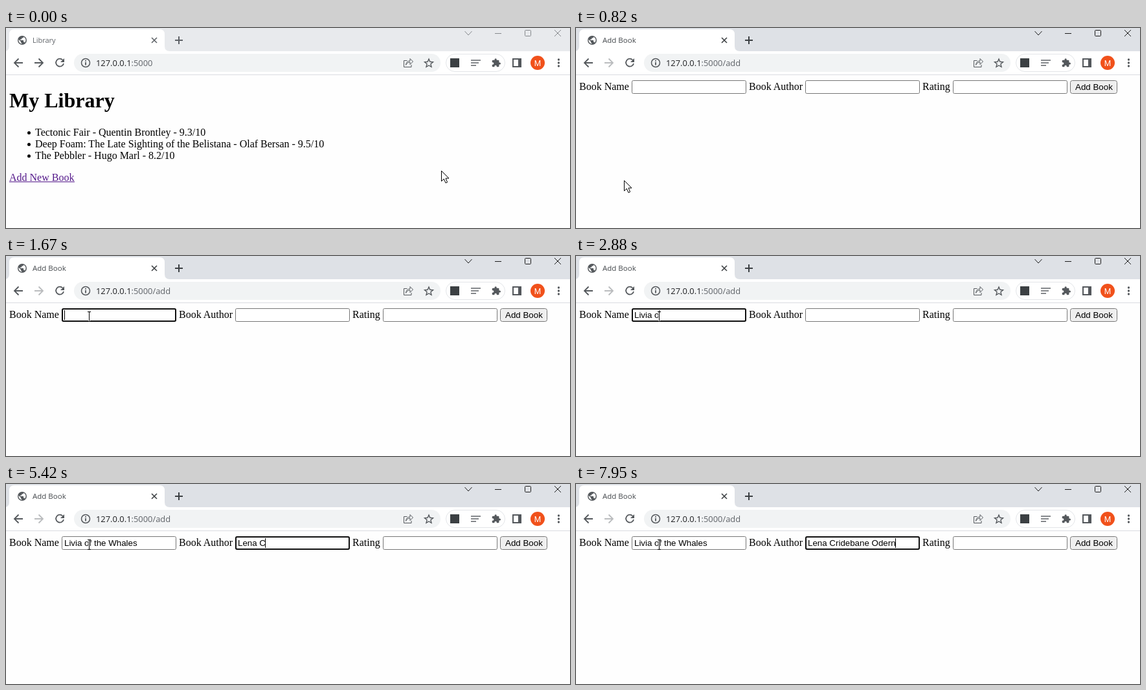
These frames come from a looping animation (871x310 px, 8000 ms). An HTML page:

```html
<!DOCTYPE html>
<html lang="en">
<head>
<meta charset="utf-8">
<title>Library</title>
<style>
  html, body { margin: 0; width: 100%; height: 100%; overflow: hidden; background: #fefefe; }
  svg { display: block; }
  text { white-space: pre; }
  .serif { font: 16px "Liberation Serif", serif; }
  .sans { font: 13.333px "Liberation Sans", sans-serif; }
  .ui { font: 11px "Open Sans", sans-serif; }
  .line { fill: none; stroke: #54585c; stroke-width: 1.8; }
  .thin { fill: none; stroke-width: 1; }
  .field { fill: #fff; stroke: #767676; }
  .pointer { fill: #fff; stroke: #000; stroke-linejoin: round; }
</style>
</head>
<body>
<svg width="871" height="310" viewBox="0 0 871 310">
  <rect id="strip" width="871" height="36"/>
  <path d="M-3 36q8 0 8-8V10q0-8 8-8H237q8 0 8 8V28q0 8 8 8z" fill="#fff"/>
  <rect y="36" width="871" height="36" fill="#fff"/>
  <rect y="72" width="871" height="1" fill="#dadce0"/>

  <!-- tab -->
  <path transform="translate(16.600 10.600) scale(.7)" fill="#54585c" d="M12 2a10 10 0 1 0 0 20 10 10 0 0 0 0-20zM11 19.930A8 8 0 0 1 4.210 10.210L9 15v1q0 2 2 2zM17.900 17.390Q17.500 16 16 16h-1v-3q0-1-1-1H8v-2h2q1 0 1-1V7h2q2 0 2-2v-.41A8 8 0 0 1 17.900 17.390z"/>
  <text id="tab" class="ui" x="41" y="23"></text>
  <g id="tools" fill="none">
    <path stroke-width="1.600" d="M225 15l8 8m0-8l-8 8"/>
    <path stroke-width="2" d="M261 19h12m-6-6v12"/>
  </g>
  <g id="win" class="thin">
    <path d="M708.500 5l5.500 6 5.500-6M755 8.500h10M847 3l10 10m0-10l-10 10"/>
    <rect x="801.500" y="3.500" width="9" height="9" rx="1"/>
  </g>

  <!-- toolbar -->
  <path class="line" d="M26 54H13m6.500-6.500L13 54l6.500 6.500"/>
  <path id="forward" class="line" d="M44 54H57m-6.500-6.500L57 54l-6.500 6.500"/>
  <path class="line" d="M87.500 49.500A6 6 0 1 0 89 55"/>
  <path d="M90 47v6h-6z" fill="#54585c"/>
  <rect x="105" y="40" width="566" height="28" rx="14" fill="#f1f3f4"/>
  <circle class="line" style="stroke-width:1.500" cx="123" cy="54" r="6.500"/>
  <path class="line" d="M123 53v4.500M123 50v1.800"/>
  <text class="ui" x="139" y="59" style="font-size:12.900px" fill="#202124">127.0.0.1<tspan id="path" fill="#5f6368"></tspan></text>
  <path class="line" style="stroke-width:1" d="M619.500 50.500h-5v10h11.500V57M617.500 57.500q.5-6.500 6.500-6.500V47.500l4.500 4.500-4.500 4.500V53q-4.500 0-6.500 4.500z"/>
  <path class="line" style="stroke-width:1.400" d="M653 48l1.800 4.300 4.700.4-3.600 3.100 1.100 4.600-4-2.400-4 2.400 1.100-4.600-3.600-3.100 4.700-.4z"/>
  <rect x="679.500" y="40.500" width="91" height="27" rx="13.500" fill="#fff" stroke="#e3e5e8"/>
  <rect x="686" y="47" width="14" height="14" fill="#3c4043"/>
  <path class="line" style="stroke:#85888c;stroke-width:2" d="M718 50h15M718 54h12M718 58h8"/>
  <path transform="translate(749.500 46.500) scale(.63)" fill="#54585c" d="M20.500 11H19V7q0-2-2-2h-4V3.500a2.500 2.500 0 0 0-5 0V5H4Q2 5 2 7v3.800h1.500a2.700 2.700 0 0 1 0 5.400H2V20q0 2 2 2h3.800v-1.500a2.700 2.700 0 0 1 5.400 0V22H17q2 0 2-2v-4h1.500a2.500 2.500 0 0 0 0-5z"/>
  <rect class="line" x="783" y="48" width="12" height="12" style="stroke-width:2"/>
  <rect x="791" y="48" width="4" height="12" fill="#54585c"/>
  <circle cx="821" cy="54" r="11" fill="#f1511b"/>
  <text x="821" y="58.500" text-anchor="middle" fill="#fff" style="font:12px Roboto,sans-serif">M</text>
  <path d="M853.500 49v0m0 5v0m0 5v0" stroke="#54585c" stroke-width="3.300" stroke-linecap="round"/>

  <!-- pages -->
  <g id="list" class="serif">
    <text x="5" y="123" style="font-size:32px;font-weight:bold">My Library</text>
    <path d="M35.500 162.500v0m0 18v0m0 18v0" stroke="#000" stroke-width="5" stroke-linecap="round"/>
    <text x="45" y="167">Tectonic Fair - Quentin Brontley - 9.3/10</text>
    <text x="45" y="185">Deep Foam: The Late Sighting of the Belistana - Olaf Bersan - 9.5/10</text>
    <text x="45" y="203">The Pebbler - Hugo Marl - 8.2/10</text>
    <text x="5" y="237" fill="#551a8b">Add New Book</text>
    <rect x="5" y="238" width="101" height="1" fill="#551a8b"/>
    <rect id="edge" x="105" y="223" width="1" height="17"/>
  </g>
  <g id="form">
    <text class="serif" x="5" y="96">Book Name</text>
    <text class="serif" x="267" y="96">Book Author</text>
    <text class="serif" x="535" y="96">Rating</text>
    <rect class="field" x="86.500" y="81.500" width="176" height="20" rx="2"/>
    <rect class="field" x="354.500" y="81.500" width="176" height="20" rx="2"/>
    <rect class="field" x="582.500" y="81.500" width="176" height="20" rx="2"/>
    <rect class="field" x="763.500" y="81.500" width="72" height="20" rx="3" style="fill:#efefef"/>
    <text class="sans" x="771" y="96">Add Book</text>
    <rect id="ring" y="82" width="175" height="19" rx="2" fill="#fff" stroke="#101010" stroke-width="2"/>
    <text id="name" class="sans" x="90" y="96"></text>
    <text id="author" class="sans" x="358" y="96"></text>
    <rect id="caret" y="84" width="1" height="15"/>
  </g>

  <circle id="glow" r="11" fill="#fbf030" opacity=".6"/>
  <g id="mouse">
    <path id="arrow" class="pointer" d="M.5.5V16.500L4.300 13 7 19.200 9.600 18 7 12H12z"/>
    <path id="hand" class="pointer" d="M-2 2Q-2 0 0 0T2 2V8Q4 6.800 5 8.600 7 7.500 8 9.400 10.500 8.600 10.500 11V16Q10 19 8 22H-1Q-3 18-6.500 14.500-8 12.500-6 11.500-4.500 11-2 14z"/>
    <g id="beam" fill="none">
      <path d="M.5-7V8" stroke="#fff" stroke-width="3"/>
      <path d="M-2-7.500H3M.5-7V7M-2 7.500H3" stroke="#000"/>
    </g>
  </g>
</svg>
<script>
const LOOP = 8000, CLICK = 655, OPEN = 820, FOCUS = 1630, TAB = 4300, BLINK = 490;
const el = id => document.getElementById(id);
const show = (id, on) => el(id).style.display = on ? "" : "none";
const clamp = v => Math.max(0, Math.min(1, v));
const mix = (a, b, p) => a + (b - a) * p;

// n evenly spaced key presses from a to b
const span = (a, b, n) => Array.from({ length: n }, (_, i) => a + (b - a) * i / (n - 1));

const fields = [
  { id: "name", x: 86, text: "Livia of the Whales", start: FOCUS,
    keys: [2220, ...span(2470, 3230, 11), 3280, 3440, 3590, ...span(3740, 4040, 4)] },
  { id: "author", x: 354, text: "Lena Cridebane Odern", start: TAB,
    keys: [4610, ...span(4760, 5010, 4), 5420, ...span(5620, 5870, 4), ...span(6030, 6230, 3),
           ...span(6380, 6490, 2), 7440, ...span(7590, 7740, 3), 7950] }
];

function mouseAt(t) {
  if (t < OPEN) {
    const p = clamp((t - 20) / 600), e = p * p * (3 - 2 * p);
    return [mix(672, 74, e), mix(221, 236, e)];
  }
  const e = 1 - (1 - clamp((t - 860) / 620)) ** 2;
  return [mix(74, 128, e), mix(236, 94, e)];
}

function drawMouse(t) {
  const [x, y] = mouseAt(t);
  const hand = t < OPEN && x < 106, beam = t >= OPEN && y < 102;
  el("mouse").setAttribute("transform", `translate(${Math.round(x)} ${Math.round(y)})`);
  show("hand", hand);
  show("beam", beam);
  show("arrow", !hand && !beam);
  el("glow").setAttribute("cx", x - 1);
  el("glow").setAttribute("cy", y - 2);
  show("glow", t >= CLICK && t < OPEN || t >= 1560 && t < 1670);
}

function drawForm(t) {
  for (const f of fields) el(f.id).textContent = f.text.slice(0, f.keys.filter(k => k <= t).length);
  const on = t >= FOCUS;
  show("ring", on);
  show("caret", on);
  if (!on) return;
  const f = fields[t < TAB ? 0 : 1];
  const last = Math.max(f.start, ...f.keys.filter(k => k <= t));
  el("ring").setAttribute("x", f.x + 1);
  el("caret").setAttribute("x", Math.floor(f.x + 4 + el(f.id).getComputedTextLength()));
  show("caret", (t - last) % (2 * BLINK) < BLINK);
}

function draw(t) {
  const active = t >= CLICK, form = t >= OPEN;
  el("strip").setAttribute("fill", active ? "#dee1e6" : "#e8eaed");
  el("win").setAttribute("stroke", active ? "#1a1a1a" : "#85888c");
  el("tools").setAttribute("stroke", active ? "#3c4043" : "#5f6368");
  el("tab").setAttribute("fill", active ? "#45494d" : "#5f6368");
  el("tab").textContent = form ? "Add Book" : "Library";
  el("tab").style.fontSize = form ? "11.5px" : "11px";
  el("path").textContent = form ? ":5000/add" : ":5000";
  el("forward").style.stroke = form ? "#babcbe" : "";
  show("list", !form);
  show("form", form);
  show("edge", active);
  if (form) drawForm(t);
  drawMouse(t);
}

const begin = performance.now();
function tick() {
  draw((performance.now() - begin) % LOOP);
  requestAnimationFrame(tick);
}
tick();
</script>
</body>
</html>
```
